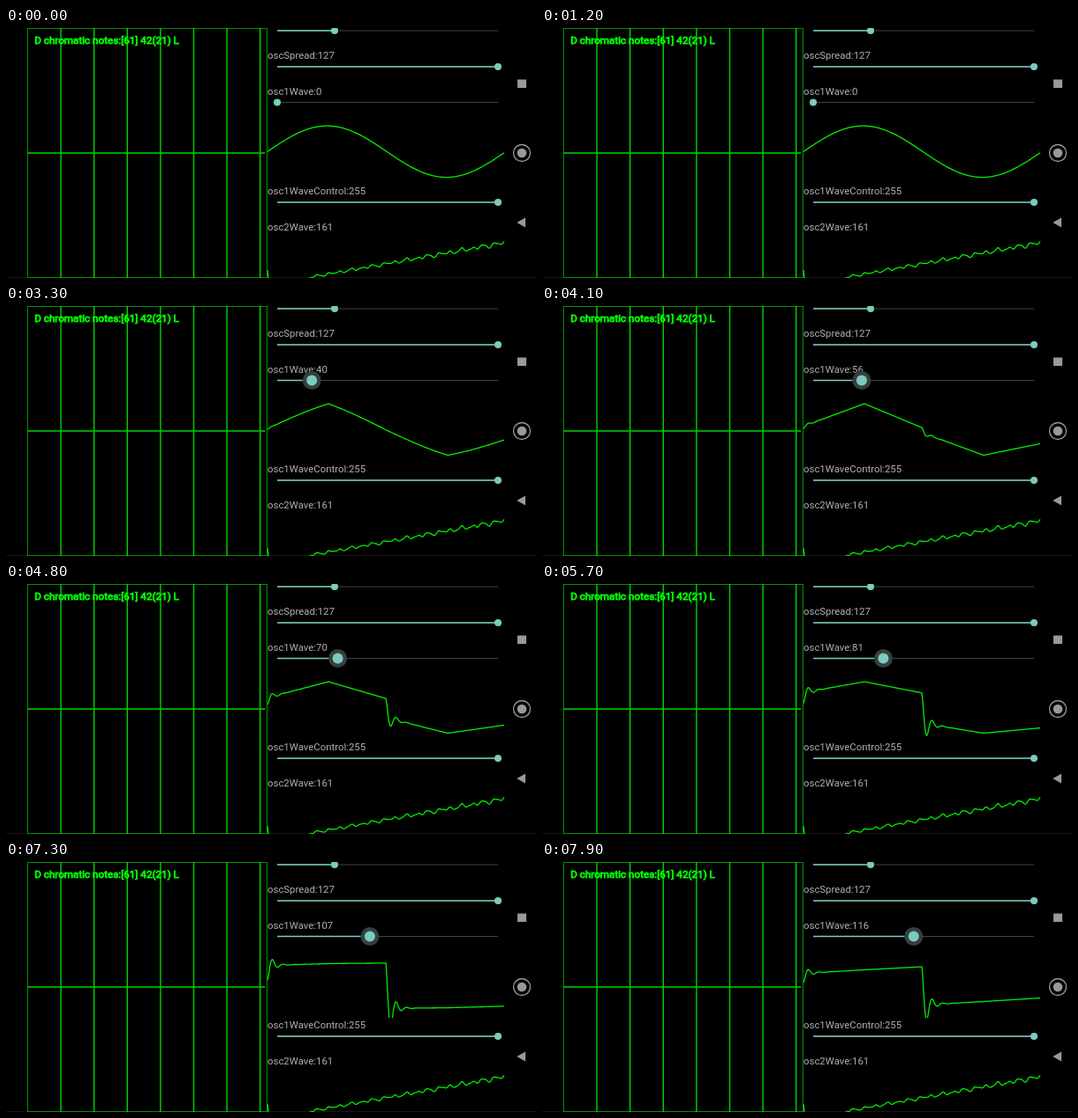
Write an HTML page with a canvas that moves like this. It is 600 px wide and 284 px high and loops after 8000 ms.

```html
<!DOCTYPE html>
<html lang="en">
<head>
<meta charset="utf-8">
<title>Oscillator wave control</title>
<style>
  html, body { margin: 0; width: 100%; height: 100%; overflow: hidden; background: #000; }
  canvas { display: block; }
</style>
</head>
<body>
<canvas id="stage" width="600" height="284"></canvas>
<script>
const ctx = document.getElementById('stage').getContext('2d');
const LOOP = 8000, GREEN = '#00f000', TEAL = '#7accbf', GREY = '#b0b0b0', NAV = '#999';
const LEFT = 296, HALF = 430, RIGHT = 564;

// Time in ms -> slider value.
const dragKeys = [[0, 0], [1400, 0], [2000, 14], [3300, 40], [4800, 70], [5700, 81], [6700, 97], [7900, 116]];

// Slider value -> heights: edge, start, crest, before drop, after drop, trough, end.
const shapeKeys = [
  [51, 140, 139, 111, 141, 141, 169.5, 155],
  [97, 133, 115, 111, 114.5, 167, 169.5, 168],
  [102, 133, 112.5, 111.5, 112.5, 168.5, 169.5, 169],
  [116, 137, 126.5, 122.5, 119, 162.5, 158.5, 154.5]
];

const mix = (a, b, k) => a + (b - a) * k;

// Linear interpolation between keys, held at both ends.
function sample(keys, at) {
  const last = keys.length - 1;
  if (at <= keys[0][0]) return keys[0].slice(1);
  if (at >= keys[last][0]) return keys[last].slice(1);
  const i = keys.findIndex(key => key[0] > at);
  const [a, b] = [keys[i - 1], keys[i]];
  const k = (at - a[0]) / (b[0] - a[0]);
  return a.slice(1).map((v, j) => mix(v, b[j + 1], k));
}

function line(points, color, width = 1) {
  ctx.beginPath();
  points.forEach(p => ctx.lineTo(...p));
  ctx.strokeStyle = color;
  ctx.lineWidth = width;
  ctx.stroke();
}

function disc(x, y, r, color) {
  ctx.beginPath();
  ctx.arc(x, y, r, 0, 2 * Math.PI);
  ctx.fillStyle = color;
  ctx.fill();
}

function curve(from, to, height) {
  const points = [];
  for (let x = from; x <= to; x += 0.5) points.push([x, height(x)]);
  line(points, GREEN, 1.3);
}

function label(text, y) {
  ctx.font = '11.4px Roboto, sans-serif';
  ctx.fillStyle = GREY;
  ctx.fillText(text, LEFT, y);
}

function slider(x, y, pressed) {
  line([[307, y], [557, y]], '#424242', 1.2);
  line([[307, y], [x, y]], TEAL, 1.7);
  if (pressed) disc(x, y, 10.5, '#363f3e');
  disc(x, y, pressed ? 6 : 4, TEAL);
}

function grid() {
  ctx.strokeStyle = '#009000';
  ctx.lineWidth = 1;
  ctx.strokeRect(24.5, 0.5, 271, 283);
  for (let i = 1; i <= 7; i++) {
    const x = 24.5 + 37.6 * i;
    line([[x, 0], [x, 284]], '#00d400', 1.4);
  }
  line([[25, 142], [293.5, 142]], '#00d400', 1.4);
  ctx.font = '11.7px Roboto, sans-serif';
  ctx.fillStyle = ctx.strokeStyle = '#00ff00';
  ctx.lineWidth = 0.9;
  const title = 'D chromatic notes:[61] 42(21) L';
  ctx.fillText(title, 32.2, 17.5);
  ctx.strokeText(title, 32.2, 17.5);
}

function navigation() {
  ctx.fillStyle = NAV;
  ctx.fillRect(579, 58.5, 10, 9.5);
  disc(584, 142, 5.3, NAV);
  ctx.beginPath();
  ctx.arc(584, 142, 9.5, 0, 2 * Math.PI);
  ctx.strokeStyle = NAV;
  ctx.lineWidth = 1.3;
  ctx.stroke();
  ctx.beginPath();
  ctx.moveTo(578.3, 221);
  ctx.lineTo(588, 215.5);
  ctx.lineTo(588, 226.5);
  ctx.fillStyle = NAV;
  ctx.fill();
}

const ringing = u => u < 0 ? 0 : Math.exp(-u / 6) * Math.cos(Math.PI * u / 6);

// Sine turns into triangle, then square, then saw.
function firstWave(value) {
  const [edge, start, crest, before, after, trough, end] = sample(shapeKeys, value);
  const sineShare = Math.max(0, 1 - value / 51);
  const rising = [[LEFT, start], [365, crest], [HALF, before]];
  const falling = [[HALF, after], [500, trough], [RIGHT, end]];
  return x => {
    const sine = 140.4 - 29.2 * Math.sin(2 * Math.PI * (x - LEFT) / 270);
    const straight = sample(x < HALF ? rising : falling, x)[0]
      + (edge - start) * ringing(x - LEFT)
      + (before - after) * ringing(x - HALF);
    return mix(straight, sine, sineShare);
  };
}

function secondWave(x) {
  const ripple = (size, period, crest) => size * Math.cos(2 * Math.PI * (x - crest) / period);
  const growth = mix(0.7, 1.3, (x - 344) / 220);
  return 283 - 0.178 * (x - 345)
    - growth * (ripple(1.4, 12.5, 453) + ripple(0.7, 20.8, 558) + ripple(0.5, 6.9, 558));
}

function draw(time) {
  const value = Math.round(sample(dragKeys, time)[0]);
  ctx.fillStyle = '#000';
  ctx.fillRect(0, 0, 600, 284);
  line([[0, 283.5], [600, 283.5]], '#1c1216');
  grid();

  slider(372, 3);
  label('oscSpread:127', 35);
  slider(557, 44);
  label('osc1Wave:' + value, 76);
  slider(307 + value * 250 / 255, 84.5, time >= 1500);
  label('osc1WaveControl:255', 189);
  slider(557, 198);
  label('osc2Wave:161', 230);

  ctx.save();
  ctx.beginPath();
  ctx.rect(LEFT - 0.5, 100, 269, 77);
  ctx.clip();
  curve(LEFT, RIGHT, firstWave(value));
  ctx.restore();
  curve(344, RIGHT, secondWave);
  line([[296, 275], [297, 284]], GREEN, 1.3);
  navigation();
}

function tick() {
  const time = performance.now() % LOOP;
  draw(Math.floor(time / 100) * 100);
  requestAnimationFrame(tick);
}
tick();
</script>
</body>
</html>
```
